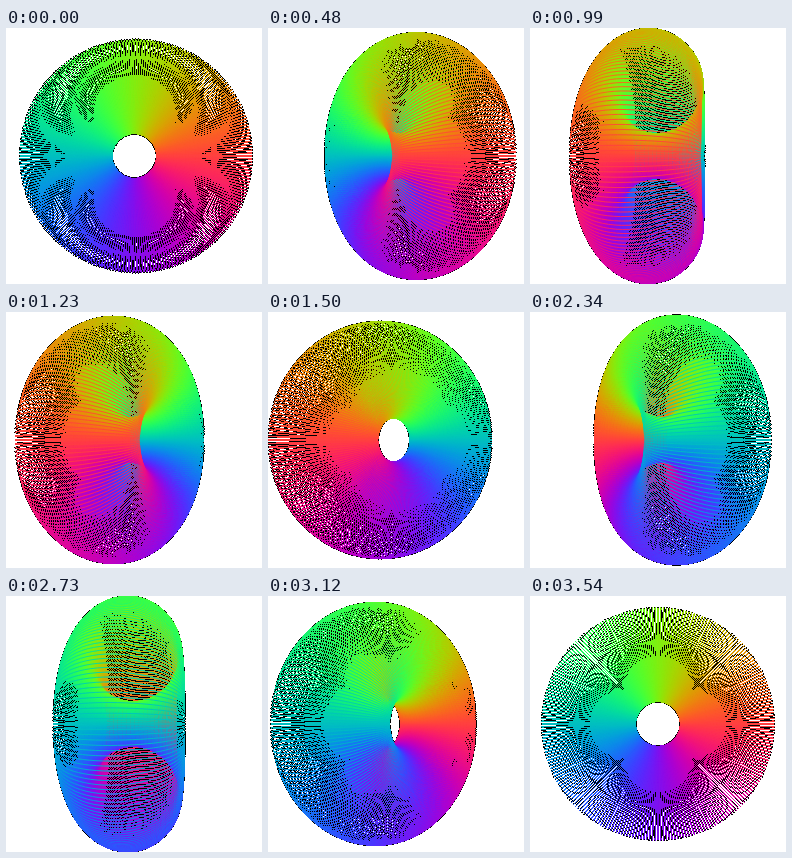
An HTML page with a canvas that plays this animation: 256 px wide and 256 px high, repeating every 3.57 s.

```html
<!DOCTYPE html>
<html>
<head>
<meta charset="utf-8">
<title>Spinning torus</title>
<style>
  html, body { margin: 0; width: 100%; height: 100%; overflow: hidden; background: #fff; }
  canvas { display: block; }
</style>
</head>
<body>
<canvas id="stage" width="256" height="256"></canvas>
<script>
const SIZE = 256, STEPS = 119, STEP_MS = 30;
const RINGS = 256, SEGMENTS = 72;
const MAJOR = 0.3, MINOR = 0.2;             // in units of the camera distance
const FOCAL = SIZE / 2 / Math.tan(Math.PI / 6);
const TAU = 2 * Math.PI;
const ctx = document.getElementById('stage').getContext('2d', { willReadFrequently: true });

function sinebow(t) {
  const channel = k => Math.round(255 * Math.cos(Math.PI * (t - k / 3)) ** 2);
  return `rgb(${channel(0)},${channel(1)},${channel(2)})`;
}

const rings = Array.from({ length: RINGS }, (_, i) => ({
  cos: Math.cos(TAU * i / RINGS),
  sin: Math.sin(TAU * i / RINGS),
  color: sinebow(i / RINGS)
}));
const profile = Array.from({ length: SEGMENTS }, (_, i) => ({
  radius: MAJOR + MINOR * Math.cos(TAU * i / SEGMENTS),
  z: MINOR * Math.sin(TAU * i / SEGMENTS)
}));

function strokeRing(ring, c, s) {
  ctx.beginPath();
  for (const { radius, z } of profile) {
    const x = radius * ring.cos;
    const scale = FOCAL / (1 - x * s - z * c);
    ctx.lineTo(SIZE / 2 + (x * c - z * s) * scale, SIZE / 2 - radius * ring.sin * scale);
  }
  ctx.closePath();
  ctx.strokeStyle = ring.color;
  ctx.stroke();
}

// One-bit alpha: empty pixels are white, faint ones black, the rest full colour.
function flatten() {
  const image = ctx.getImageData(0, 0, SIZE, SIZE), px = image.data;
  for (let i = 0; i < px.length; i += 4) {
    const alpha = px[i + 3];
    if (alpha < 128) px.fill(alpha ? 0 : 255, i, i + 3);
    px[i + 3] = 255;
  }
  ctx.putImageData(image, 0, 0);
}

function draw(step) {
  const angle = TAU * (step + 1) / STEPS % TAU;
  const c = Math.cos(angle), s = Math.sin(angle);
  ctx.clearRect(0, 0, SIZE, SIZE);
  ctx.lineWidth = 1;
  ctx.lineJoin = 'bevel';
  rings.sort((a, b) => (a.cos - b.cos) * s);
  for (const ring of rings) strokeRing(ring, c, s);
  flatten();
}

let shown = -1;
const start = performance.now();
function tick() {
  const step = Math.floor((performance.now() - start) / STEP_MS) % STEPS;
  if (step !== shown) draw(shown = step);
  requestAnimationFrame(tick);
}
tick();
</script>
</body>
</html>
```
